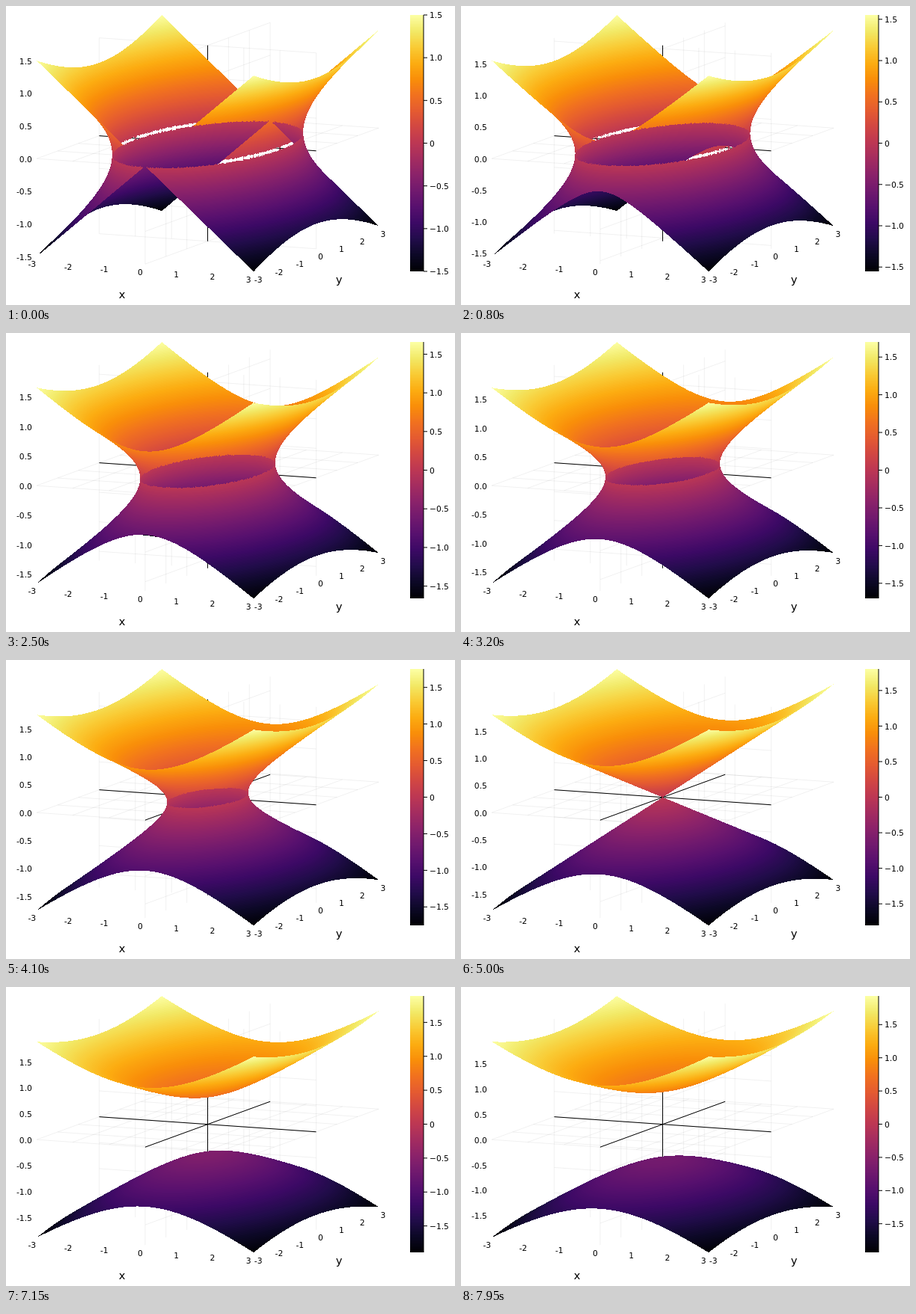
These frames come from a looping animation (600x400 px, 8 s). An HTML page with a canvas:

```html
<!DOCTYPE html>
<html>
<head>
<meta charset="utf-8">
<style>
html, body { margin: 0; width: 100%; height: 100%; overflow: hidden; background: #fff; }
canvas { position: absolute; left: 0; top: 0; }
</style>
</head>
<body>
<canvas id="plot" width="600" height="400"></canvas>
<canvas id="surface" width="600" height="400"></canvas>
<script>
const W = 600, H = 400;
const plot = document.getElementById('plot').getContext('2d');
const surface = document.getElementById('surface').getContext('2d');
const image = surface.createImageData(W, H);
const pixels = new Uint32Array(image.data.buffer);

// Orthographic view: screen steps per unit of x and y
const CX = 269.5, CY = 183.7, HALF = 131;
const XX = 48.3, XY = 3.35, YX = 27.85, YY = 10.17;
const DET = XX * YY + YX * XY;
const CELL = 0.001;   // sampling step of the surface

const inferno = [
  [0, 0, 4], [12, 8, 38], [33, 12, 74], [60, 9, 101], [87, 16, 110], [112, 25, 110],
  [138, 34, 106], [163, 44, 96], [188, 55, 84], [209, 70, 67], [228, 90, 49],
  [241, 113, 31], [249, 142, 9], [252, 172, 17], [249, 203, 53], [242, 233, 102], [252, 255, 164]
];
const palette = Array.from({ length: 256 }, (_, i) => {
  const p = i / 255 * 16, j = Math.min(15, Math.floor(p));
  return inferno[j].map((c, n) => Math.round(c + (inferno[j + 1][n] - c) * (p - j)));
});
const packed = palette.map(([r, g, b]) => (255 << 24 | b << 16 | g << 8 | r) >>> 0);

const snap = v => Math.floor(Math.abs(v) / CELL) * CELL;

// z^2 = x^2/4 + y^2/9 - s, the lower sheet painted over the upper one
function drawSurface(s, zMax) {
  const k = HALF / zMax, dz = DET / k;
  const a = YX * YX / 4 + XX * XX / 9 - dz * dz;
  pixels.fill(0);
  for (let py = 8; py < 360; py++) {
    const v = py + 0.5 - CY;
    for (let px = 36; px < 502; px++) {
      const u = px + 0.5 - CX;
      const x0 = (YY * u + YX * v) / DET, y0 = (XY * u - XX * v) / DET;
      const b = x0 * YX / 4 - y0 * XX / 9;
      const disc = b * b - a * (x0 * x0 / 4 + y0 * y0 / 9 - s);
      if (disc < 0) continue;
      const root = Math.sqrt(disc);
      let hit = null;
      for (const sign of [1, -1]) {
        const t = (-b + sign * root) / a;
        const x = x0 + t * YX, y = y0 - t * XX, z = t * dz;
        if (Math.abs(x) > 3 || Math.abs(y) > 3) continue;
        if (snap(x) ** 2 / 4 + snap(y) ** 2 / 9 < s) continue;
        if (z < 0) { hit = z; break; }
        if (hit === null) hit = z;
      }
      if (hit !== null) {
        const c = Math.round((hit / zMax + 1) * 127.5);
        pixels[py * W + px] = packed[Math.max(0, Math.min(255, c))];
      }
    }
  }
  surface.putImageData(image, 0, 0);
}

function drawPlot(zMax) {
  const k = HALF / zMax;
  const line = (p, q) => {
    for (const [i, [x, y, z]] of [p, q].entries())
      plot[i ? 'lineTo' : 'moveTo'](CX + XX * x + YX * y, CY + XY * x - YY * y - k * z);
  };
  const stroke = (color, trace) => {
    plot.strokeStyle = color;
    plot.beginPath();
    trace();
    plot.stroke();
  };
  const text = (str, x, y, align = 'center', size = 10.67) => {
    plot.font = size + 'px "DejaVu Sans", sans-serif';
    plot.textAlign = align;
    plot.fillText(str, x, y + size * 0.4);
  };

  plot.fillStyle = '#fff';
  plot.fillRect(0, 0, W, H);
  plot.lineWidth = 1;
  for (let i = -3; i <= 3; i++) {
    const z = i / 2;
    const pairs = [
      [[i, -3, 0], [i, 3, 0]], [[-3, i, 0], [3, i, 0]],
      [[i, 0, -zMax], [i, 0, zMax]], [[0, i, -zMax], [0, i, zMax]],
      [[-3, 0, z], [3, 0, z]], [[0, -3, z], [0, 3, z]]
    ];
    for (const [p, q] of pairs) stroke('rgba(0,0,0,0.06)', () => line(p, q));
  }
  stroke('#000', () => {
    line([-3, 0, 0], [3, 0, 0]);
    line([0, -3, 0], [0, 3, 0]);
    line([0, 0, -zMax], [0, 0, zMax]);
  });

  for (let y = 12; y < 355; y++) {
    const c = palette[Math.round((354 - y) / 342 * 255)];
    plot.fillStyle = `rgb(${c})`;
    plot.fillRect(540, y, 18, 1);
  }

  plot.fillStyle = '#000';
  stroke('#000', () => {
    plot.moveTo(558, 12);
    plot.lineTo(558, 355);
    for (let i = -3; i <= 3; i++) {
      const y = 183.5 - i / 2 * 171.5 / zMax;
      plot.moveTo(558, y);
      plot.lineTo(563, y);
    }
  });
  for (let i = -3; i <= 3; i++) {
    const z = (i / 2).toFixed(1);
    text(z, 34.8, 204.4 - k * i / 2, 'right');
    text(i ? z.replace('-', '\u2212') : '0', 566, 183.4 - i / 2 * 171.5 / zMax, 'left');
    text(i, 179.5 + 48.25 * i, 355.4 + 3.4 * i);
    text(i, 420.5 + 27.8 * i, 335 - 10.2 * i);
  }
  text('x', 155, 385, 'center', 14.67);
  text('y', 445, 365.5, 'center', 14.67);
}

let last = -1;
function frame(now) {
  const n = Math.floor(now % 8000 / 50);
  if (n !== last) {
    last = n;
    // The level falls to zero, rests there, then falls on
    const s = 1 - (Math.min(n, 100) + Math.max(0, n - 111)) / 100;
    const zMax = Math.sqrt(3.25 - s);
    drawPlot(zMax);
    drawSurface(s, zMax);
  }
  requestAnimationFrame(frame);
}
frame(0);
</script>
</body>
</html>
```
